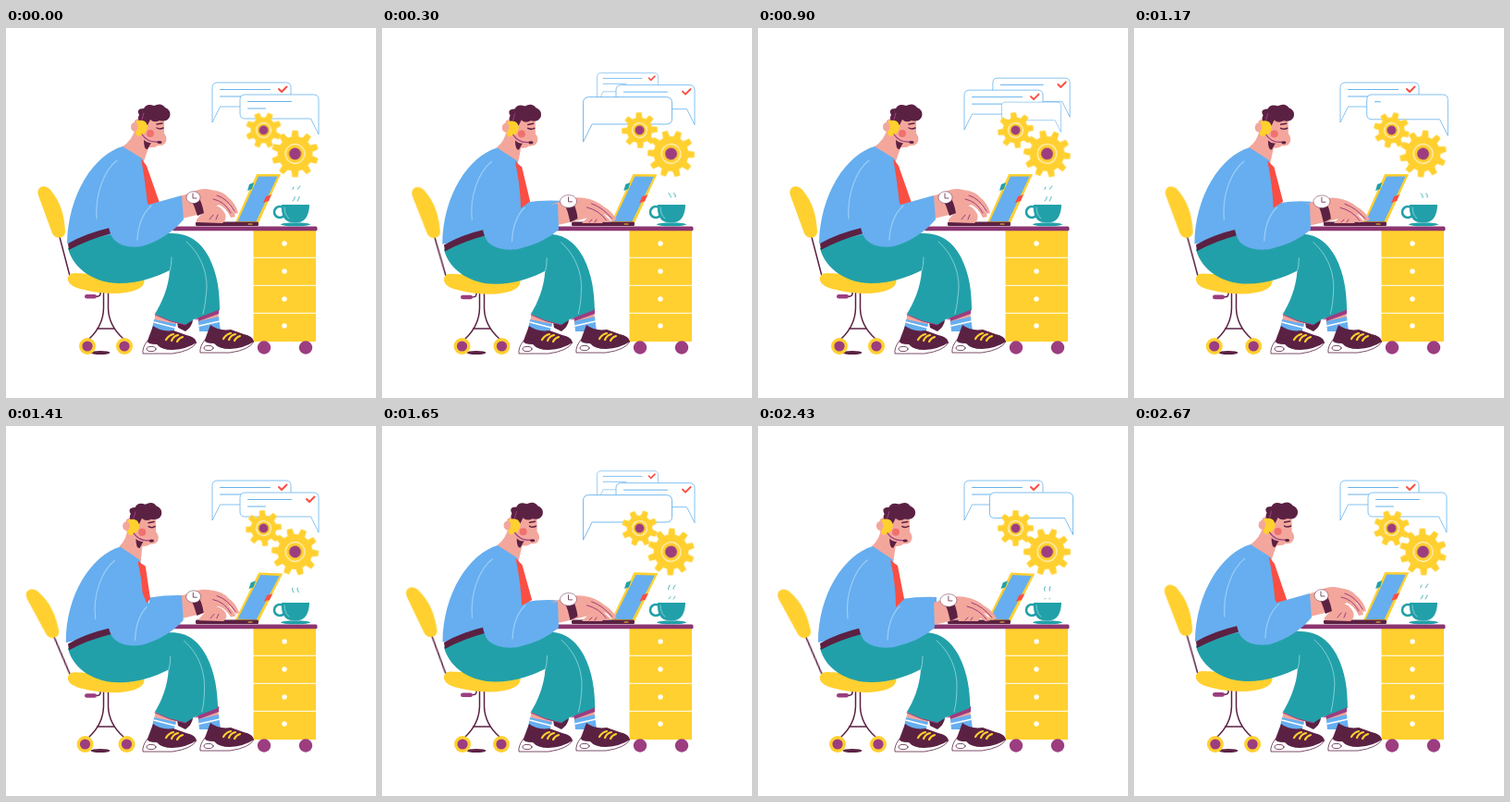
Write an HTML page that moves like this. It is 400 px wide and 400 px high and loops after 2700 ms.

```html
<!DOCTYPE html>
<html lang="en">
<head>
<meta charset="utf-8">
<title>Support desk</title>
<style>
html, body { margin: 0; width: 100%; height: 100%; overflow: hidden; background: #fff; }
svg { display: block; width: 100vw; height: 100vh; }
.yellow { fill: #ffd02f; }
.plum { fill: #5b2143; }
.mauve { fill: #9c3d80; }
.blue { fill: #66aeef; }
.teal { fill: #22a0a9; }
.skin { fill: #f3a79c; }
.red { fill: #fb4e43; }
.white { fill: #fff; }
.line { fill: none; stroke-linecap: round; stroke-linejoin: round; }
.dark { stroke: #5b2143; stroke-width: 1.5; }
.thin { stroke: #5b2143; stroke-width: .8; }
.pale { stroke: #9ccdf8; stroke-width: 1.2; }
.mint { stroke: #7fd0d4; stroke-width: 1; }
.rose { stroke: #9c3d80; stroke-width: 1; }
.ink { stroke: #66b3ee; stroke-width: 1; }
.box { fill: #fff; stroke: #66b3ee; stroke-width: .8; }
.check { stroke: #fb4e43; stroke-width: 2; }
.steam { stroke: #22a0a9; stroke-width: .8; stroke-dasharray: 5 9; animation: rise .9s linear infinite; }
@keyframes rise { to { stroke-dashoffset: -14; } }
.gear { animation: turn 2.7s linear infinite; }
@keyframes turn { to { transform: rotate(var(--turn)); } }
</style>
</head>
<body>
<svg viewBox="0 0 400 400">
  <defs>
    <g id="shoe">
      <path class="white" stroke="#5b2143" stroke-width=".8" d="M153 338Q147 346 148 352L180 352Q201 349 206 340L170 338Z"/>
      <path class="plum" d="M159 322L153 338Q152 342 163 342Q168 348 180 348Q196 347 206 340Q205 334 195 332L181 327Q168 329 159 322Z"/>
      <ellipse class="line thin" cx="157" cy="347" rx="5" ry="2.6"/>
      <path class="line" stroke="#ffd02f" stroke-width="2.2" d="M173 337Q176 332 181 331M179 338Q181 333 186 332M185 339Q187 335 191 334"/>
    </g>
    <g id="caster"><circle class="yellow" r="9"/><circle class="mauve" r="5.6"/></g>
  </defs>

  <g id="bubbles"></g>
  <g transform="translate(278.5 110.5)"><g id="small" class="gear" style="--turn:-225deg"></g></g>
  <g transform="translate(312.5 136)"><g id="big" class="gear" style="--turn:180deg"></g></g>

  <!-- desk -->
  <path class="yellow" d="M267.5 218H335V339H267.5Z"/>
  <path class="line" stroke="#fff" d="M267 248.3H336M267 278.3H336M267 308.3H336"/>
  <g class="white"><circle cx="301" cy="233" r="2.7"/><circle cx="301" cy="263" r="2.7"/><circle cx="301" cy="293" r="2.7"/><circle cx="301" cy="322" r="2.7"/></g>
  <g class="mauve"><circle cx="279" cy="345.5" r="7.2"/><circle cx="324" cy="345.5" r="7.2"/></g>
  <rect x="180" y="214.5" width="156.5" height="4.8" rx="1.5" fill="#8b3570"/>

  <!-- cup -->
  <ellipse class="line" cx="296" cy="199" rx="6" ry="6" stroke="#22a0a9" stroke-width="2.6"/>
  <path class="teal" d="M298 191H328C328 202 323 210 316 210H309C301 210 297 202 298 191Z"/>
  <ellipse class="teal" cx="313" cy="212.3" rx="16" ry="2"/>
  <path class="line mint" d="M301 194Q301 202 306 206"/>
  <path class="line steam" d="M310 187Q314 183 311 180T311 172"/>
  <path class="line steam" d="M315 187Q319 182 316 179T318 171"/>

  <!-- laptop -->
  <g id="lid">
    <path class="yellow" d="M271 158H297L273 211H247.5Z"/>
    <path class="blue" d="M273 160.5H293.5L270.5 209H250.5Z"/>
    <path class="teal" d="M263 169L268 167L266 174L261 176Z"/>
    <path class="red" d="M281 182L287 180L284 187L278 189Z"/>
  </g>
  <rect class="plum" x="205" y="209.5" width="68" height="4.6" rx="1.5"/>
  <path class="line" stroke="#ffd02f" d="M262 212H266"/>

  <!-- chair -->
  <g id="rest">
    <path class="line dark" d="M58 226L69 268"/>
    <path class="yellow" d="M35 181C32 171 42 168 48 175C59 188 63 202 64 220C64 228 53 229 50 222Z"/>
  </g>
  <ellipse class="plum" cx="102" cy="351" rx="10.5" ry="2"/>
  <path class="line dark" d="M105.5 285V303Q105 322 90 336M110.5 285V303Q111 322 127 336M98.500 325H117.500"/>
  <use id="wheelL" href="#caster"/><use id="wheelR" href="#caster"/>
  <g id="seat">
    <path class="line dark" d="M97 290Q103 291 102 285"/>
    <rect class="mauve" x="85" y="288" width="13" height="4.6" rx="2.3"/>
    <path class="yellow" d="M74 265Q66 265 67 273Q69 280 84 283Q100 287 118 287Q142 286 148 278Q152 271 146 268Z"/>
  </g>

  <!-- legs -->
  <path class="skin" d="M162 307L186 314L183 322L160 318ZM207 308L229 303L230 315L208 319Z"/>
  <path class="mauve" d="M207 312L230 303L230 309L208 317Z"/>
  <path class="blue" d="M160 315L184 320L181 330L158 325ZM208 317L230 312L232 328L209 328Z"/>
  <path class="line" stroke="#fff" stroke-width="1.5" d="M160 318L183 324M209 322L231 317"/>
  <use href="#shoe"/><use href="#shoe" x="62" y="-1"/>
  <path class="plum" d="M185 318L202 316Q201 323 194 328L186 324Z"/>
  <path class="teal" data-a="M67 238C73 262 98 276 122 276C145 276 165 268 177 262C176 280 168 298 161 309Q177 318 194 321L203 315L231 305C231 286 229 266 219 247C210 231 198 222 180 222L112 219Z"
    data-b="M67 240C73 264 98 277 122 277C145 277 165 269 176 263C175 281 168 298 161 309Q177 318 194 321L203 315L229.5 305C229 287 227 267 217 248C208 232 197 223 179 223L112 221Z"/>
  <path class="line rose" d="M161 310Q177 318 194 321M205 315L230 305"/>
  <path class="line mint" data-a="M179 248Q179 257 177 263M195 231C211 245 217 264 217 280Q216 297 213 309" data-b="M178 249Q178 258 176 264M193 232C209 246 215 265 215 281Q215 298 212 309"/>

  <!-- torso -->
  <path class="skin" data-a="M140 108Q137 121 125 129L148 147L155 127Z" data-b="M133 110Q132 122 123 130L146 149L149 128Z"/>
  <path class="blue" data-a="M155 193Q175 190 190 192L191 203L155 207Z" data-b="M155 187Q175 184 193 185L193 195L155 200Z"/>
  <path class="blue" data-a="M126 128C95 137 67 180 66 233L110 224L160 215L162 190Q157 160 147 141Z" data-b="M124 130C93 139 65 182 65 234L110 224L154 217L156 192Q153 162 145 144Z"/>
  <path class="plum" data-a="M67 233Q86 222 112 216L114 222Q88 229 68 240Z" data-b="M67 235Q86 224 112 218L114 224.5Q88 231 68 242Z"/>
  <path class="red" data-a="M146 141L152 149L166 189L153 192Q151 168 146 141Z" data-b="M143 145L151 151L158 187L149 196Q149 170 143 145Z"/>

  <!-- head -->
  <g id="head">
    <path class="skin" d="M139 100C137 116 144 127 153 129Q161 130 164 127Q173 128 173.5 120Q173 116 171 114L171 99L150 94Z"/>
    <path class="plum" d="M149 121Q153 125 157 124L153 131Q149 132 149 121Z"/>
    <circle fill="#f0716f" cx="156" cy="114" r="4"/>
    <path class="plum" d="M146 103Q141 99 144 94Q140 87 149 87Q152 81 160 84Q168 80 172 86Q179 89 177 96Q174 102 166 100Q160 103 156 99L153 105Z"/>
    <path class="line dark" d="M163 108Q166 110 170 108M163 104L169 103"/>
    <path class="line rose" d="M147 99L149 92"/>
    <ellipse class="skin" cx="139" cy="107" rx="4" ry="5"/>
    <path class="yellow" d="M140 101Q151 97 153 106Q153 115 143 117Q138 114 141 111Q145 106 140 101Z"/>
    <path class="line rose" d="M147 115Q153 124 164 123" style="stroke-width:1.3"/>
    <ellipse class="plum" cx="166" cy="123.5" rx="2.6" ry="1.6"/>
  </g>

  <!-- arms -->
  <path class="skin" data-pose="arm" data-a="M206 207L218 194Q230 188 237 201Q239 207 234 211L206 210Z" data-b="M216 211L222 205Q232 201 240 206Q241 208 238 211L216 211Z"/>
  <path class="line rose" data-pose="arm" data-a="M220 207L224 202M227 207L229 202" data-b="M224 210L227 207M230 210L232 207"/>
  <g id="hand">
    <path class="skin" data-pose="arm" data-a="M182 184L200 178Q212 172 222 175Q234 176 240 183Q248 189 251 200L247 201Q244 193 239 190Q246 197 248 204L243 205Q238 194 230 191Q222 196 215 200L182 208Z"
      data-b="M182 194L201 187Q213 183 224 185Q236 187 244 194Q253 199 258 208L253 210Q249 203 244 202Q249 207 252 210L246 211Q238 205 231 205Q224 207 216 209L182 217Z"/>
    <path class="line rose" data-pose="arm" data-a="M228 181Q239 184 247 198M224 185Q236 187 243 200" data-b="M231 191Q243 195 253 207M226 195Q239 198 247 209"/>
    <path class="plum" data-pose="arm" data-a="M198 182L206 179Q212 188 214 200L207 203Q204 192 198 182Z" data-b="M201 189L209 185Q215 196 216 207L208 211Q206 200 201 189Z"/>
    <path class="white" stroke="#5b2143" stroke-width=".5" data-pose="arm" data-a="M195 184C195 175 209 174 210 183C210 191 197 192 195 184Z" data-b="M197 189C197 180 214 179 215 188C215 197 199 198 197 189Z"/>
    <path class="line thin" data-pose="arm" data-a="M202 179V184H206" data-b="M206 184V189H210"/>
  </g>
  <path class="blue" data-pose="arm" data-a="M122 150C107 180 106 219 118 230Q128 239 147 236Q174 228 192 207L190 181L154 191Q146 174 136 154Z"
    data-b="M120 152C105 182 104 221 116 233Q128 242 147 239Q174 233 191 218L190 190L149 196Q144 178 134 156Z"/>
  <path class="line pale" data-a="M98 206C96 180 106 154 120 143M142 229Q143 205 157 192" data-b="M97 208C94 182 104 156 118 145M140 231Q141 207 153 195"/>
</svg>
<script>
const $ = id => document.getElementById(id);
const NS = 'http://www.w3.org/2000/svg';
const clamp = x => Math.min(1, Math.max(0, x));
const wave = (t, peak, period) => Math.cos((t - peak) / period * 2 * Math.PI);
const NUM = /-?\d+(\.\d+)?/g;

function add(parent, tag, attrs) {
  const el = document.createElementNS(NS, tag);
  for (const key in attrs) el.setAttribute(key, attrs[key]);
  return parent.appendChild(el);
}

// Paths that blend between a forward pose (a) and a resting pose (b).
const morphs = [...document.querySelectorAll('[data-a]')].map(el => {
  const { a, b, pose } = el.dataset;
  return { el, pose, b, from: b.match(NUM).map(Number), to: a.match(NUM).map(Number) };
});

function blend({ el, b, from, to }, k) {
  let i = 0;
  el.setAttribute('d', b.replace(NUM, () => {
    const v = from[i] + (to[i] - from[i]) * k;
    i++;
    return v.toFixed(2);
  }));
}

function gear(id, teeth, outer, inner, ring, hub) {
  const points = [];
  for (let i = 0; i < teeth; i++) {
    for (const [off, r] of [[.21, inner], [.33, outer], [.67, outer], [.79, inner]]) {
      const a = (i + off) / teeth * 2 * Math.PI;
      points.push(`${(r * Math.cos(a)).toFixed(2)},${(r * Math.sin(a)).toFixed(2)}`);
    }
  }
  add($(id), 'polygon', { class: 'yellow', stroke: '#ffd02f', 'stroke-linejoin': 'round', points: points.join(' ') });
  add($(id), 'circle', { class: 'line', stroke: '#fff', r: ring });
  add($(id), 'circle', { class: 'mauve', r: hub });
}
gear('small', 8, 19, 13.5, 8, 5);
gear('big', 10, 25, 18.5, 10.5, 6.5);

// Three stacked messages, oldest first.
const STEP = 675;
const bubbles = [2, 1, 0].map(rank => {
  const g = add($('bubbles'), 'g', {});
  return {
    rank, g,
    box: add(g, 'path', { class: 'box', d: 'M-37 0H37Q42.5 0 42.5 5.5V21Q42.5 26 37 26H-34L-42.5 43V5.5Q-42.5 0 -37 0Z' }),
    text: add(g, 'path', { class: 'line ink' }),
    check: add(g, 'path', { class: 'line check', d: 'M29.5 7L32.5 10L38 4.5' })
  };
});

const slide = age => 1 - (1 - clamp((age - 180) / 220)) ** 2;

function pop(age) {
  const p = clamp((age - 180) / 110);
  return p < 1 ? 1.14 * (1 - (1 - p) ** 2) : 1 + .14 * Math.exp((290 - age) / 135) * clamp((640 - age) / 60);
}

function drawBubble(b, t) {
  const n = Math.floor(t / STEP);
  const age = t - n * STEP + b.rank * STEP;
  const left = (n + b.rank) % 2 === 0;
  const y = 85 - 13 * (slide(age) + slide(age - STEP) + slide(age - 2 * STEP));
  const size = pop(age) * (1 - clamp((age - 2 * STEP - 180) / 220) ** 2.5);
  b.g.setAttribute('transform', `translate(${left ? 265.5 : 295.5} ${y}) scale(${size})`);
  b.g.style.display = size > .01 ? '' : 'none';
  b.box.setAttribute('transform', left ? '' : 'scale(-1 1)');

  const late = clamp((age - 700) / 150);
  const first = (left ? 39 + 15 * late : 47) * clamp((age - 480) / 130);
  const second = (left ? 32 : 19) * clamp((age - 530) / 90);
  const row = (len, at) => len > 0 ? `M-34 ${at}h${len}` : '';
  b.text.setAttribute('d', row(first, 7.5) + row(second, 15));
  b.check.style.display = age > 720 ? '' : 'none';
}

function draw(t) {
  const lean = (wave(t, 48, 900) + .61) / 1.555;
  const back = 1 - lean;
  const rock = wave(t, 130, 900) - .62;
  const rise = clamp((wave(t, -10, 450) + .2) / 1.15);
  const lift = rise * rise * (3 - 2 * rise);
  const reach = 3.4 * (wave(t, 165, 450) - 1) * (1 - lift);

  for (const m of morphs) blend(m, m.pose ? lift : lean);
  const move = (id, value) => $(id).setAttribute('transform', value);
  move('rest', `rotate(${5.5 * rock} 70 268)`);
  move('lid', `rotate(${-1.6 * rock} 260 211)`);
  move('seat', `translate(0 ${back})`);
  move('wheelL', `translate(${88 - 2 * back} 344)`);
  move('wheelR', `translate(${128 + 2 * back} 344)`);
  move('head', `translate(${-7 * back} ${.7 * back}) rotate(${-back} 155 115)`);
  move('hand', `translate(${reach} ${.25 * reach})`);
  for (const b of bubbles) drawBubble(b, t);
}

function frame() {
  draw(performance.now() % 2700);
  requestAnimationFrame(frame);
}
frame();
</script>
</body>
</html>
```
